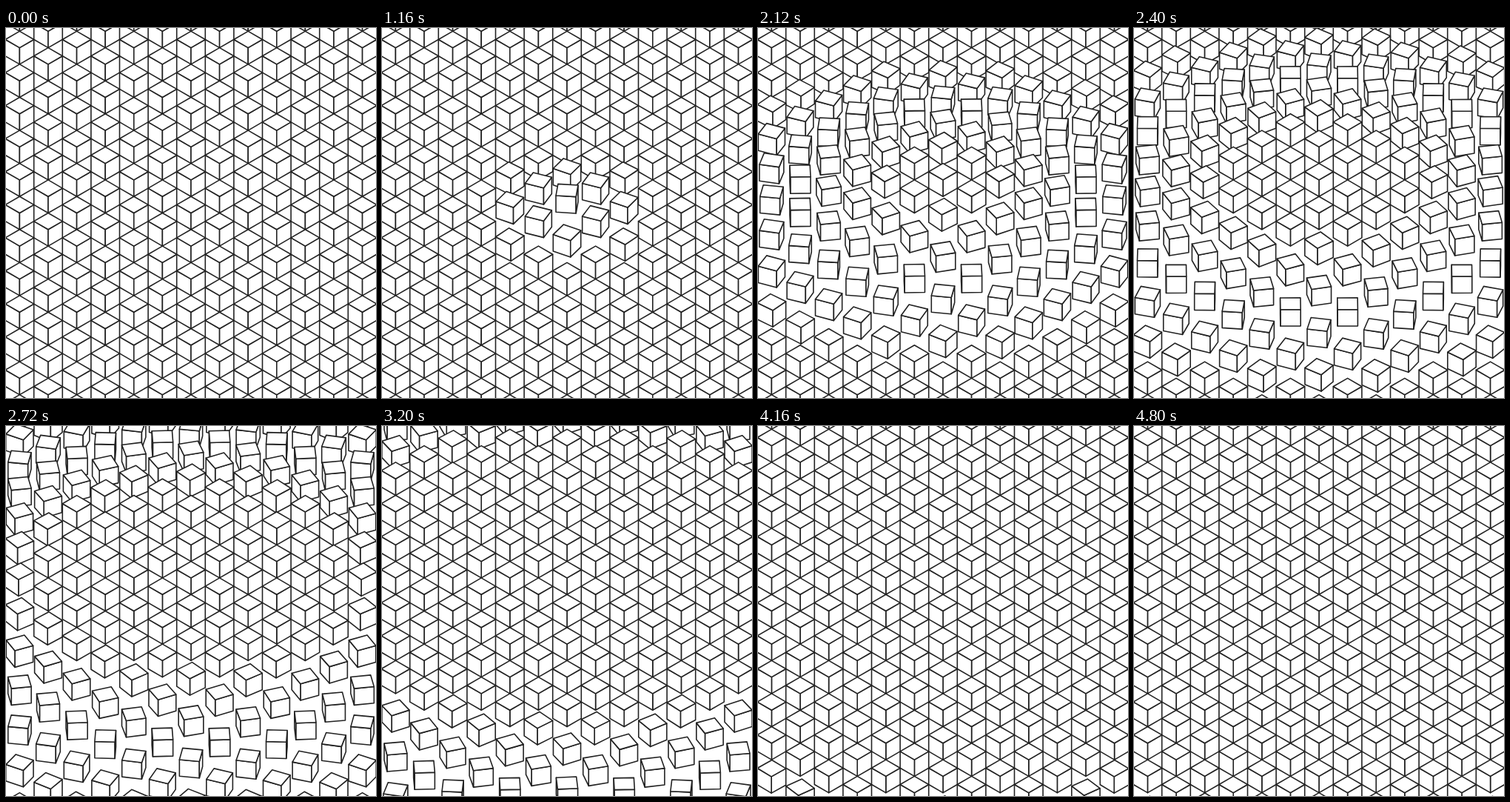
Animation of 500x499 px, one loop 4840 ms. Source, as an HTML page with a canvas:

```html
<!DOCTYPE html>
<html lang="en">
<head>
<meta charset="utf-8">
<title>Turning cubes</title>
<style>
  html, body { margin: 0; width: 100%; height: 100%; overflow: hidden; background: #fff; }
  canvas { display: block; width: 500px; height: 499px; }
</style>
</head>
<body>
<canvas id="stage" width="500" height="499"></canvas>
<script>
const ctx = document.getElementById('stage').getContext('2d');
const LOOP = 4840, STEP = 40;
const CX = 250, CY = 249.5;
const R = 19.3;                   // half diagonal of a cube's top face
const SQUASH = 1 / Math.sqrt(3);  // isometric foreshortening of the ground
const H = 2 * R * SQUASH;         // projected cube height
const SPAN = 1 / 3, DELAY = 0.065;

const smooth = u => u * u * (3 - 2 * u);
const clamp = v => Math.max(0, Math.min(1, v));

// Cubes on a square ground grid, sorted back to front
const cubes = [];
for (let i = -11; i <= 11; i++) {
  for (let j = -11; j <= 11; j++) {
    const x = CX + (i - j) * 2 * R, y = CY + (i + j) * H;
    if (x > -R && x < 500 + R && y > -2 * H && y < 499 + 4 * H) {
      cubes.push({ x, y, start: DELAY * Math.hypot(i, j) });
    }
  }
}
cubes.sort((a, b) => a.y - b.y);

function face(points) {
  ctx.beginPath();
  for (const [x, y] of points) ctx.lineTo(x, y);
  ctx.closePath();
  ctx.fill();
  ctx.stroke();
}

// A quarter turn about the vertical while sliding back one row
function drawCube(x, y, p) {
  const top = y - 2 * H * p - H / 2;
  const turn = (1 - p) * Math.PI / 2;
  const corners = [0, 1, 2, 3].map(m => {
    const a = turn + m * Math.PI / 2;
    return [x + R * Math.cos(a), top + R * SQUASH * Math.sin(a)];
  });
  for (let m = 0; m < 4; m++) {
    const a = corners[m], b = corners[(m + 1) % 4];
    if (a[0] - b[0] > 1e-6) {
      face([a, b, [b[0], b[1] + H], [a[0], a[1] + H]]);
    }
  }
  face(corners);
}

function draw(ms) {
  const g = smooth(ms / LOOP);
  ctx.fillStyle = '#fff';
  ctx.fillRect(0, 0, 500, 499);
  ctx.strokeStyle = '#222';
  ctx.lineWidth = 1.6;
  ctx.lineJoin = 'round';
  for (const c of cubes) drawCube(c.x, c.y, clamp((g - c.start) / SPAN));
}

let origin;
function tick(now) {
  origin ??= now;
  const ms = (now - origin) % LOOP;
  draw(Math.floor(ms / STEP) * STEP);
  requestAnimationFrame(tick);
}
draw(0);
requestAnimationFrame(tick);
</script>
</body>
</html>
```
